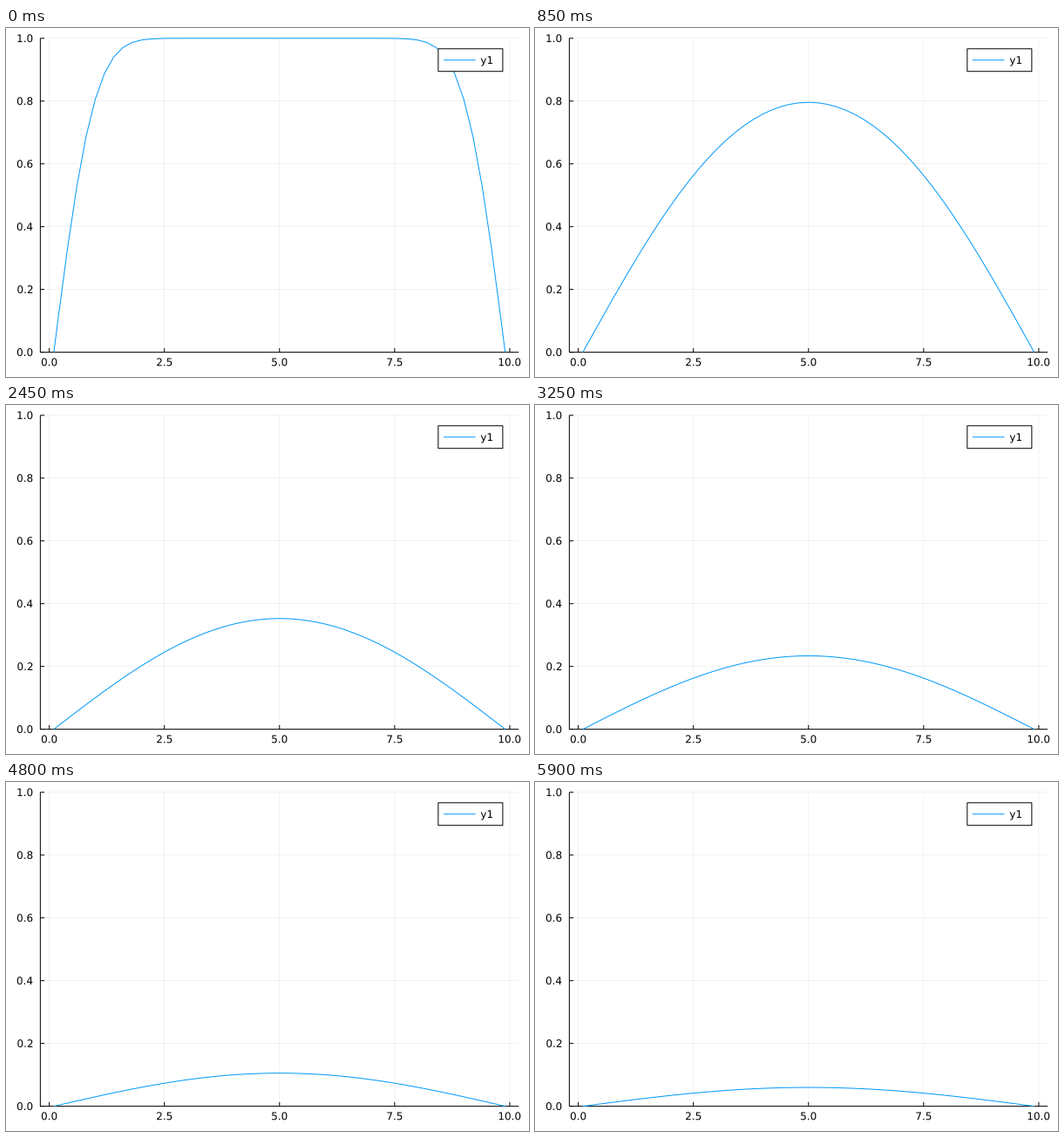
Write a matplotlib script that moves like this. It is 600x400 px and loops after 5950 ms.

```python
import numpy as np
import matplotlib.pyplot as plt
from matplotlib.animation import FuncAnimation
from matplotlib.patches import PathPatch, Rectangle
from matplotlib.textpath import TextPath
from matplotlib.transforms import Affine2D

W, H, DPI = 600, 400, 100
FRAMES, INTERVAL = 119, 50
PX = 72 / DPI                  # one pixel in points
FONT = 12                      # text size in pixels
BLUE = "#009afa"

# Plot area in pixels, y pointing down
LEFT, RIGHT, TOP, BOTTOM = 39.37, 588.19, 11.811, 371.6125
XMIN, XMAX = -0.194, 10.194
TICK = 4.72

# Heat equation on cells of width 0.2, with zero walls at 0.1 and 9.9
CELLS, RATE = 49, 0.25
FIRST, STRIDE = 24, 25


def to_x(x):
    return LEFT + (x - XMIN) / (XMAX - XMIN) * (RIGHT - LEFT)


def to_y(y):
    return BOTTOM - y * (BOTTOM - TOP)


def diffuse():
    u = np.ones(CELLS)
    rows = []
    for step in range(1, FIRST + STRIDE * (FRAMES - 1) + 1):
        padded = np.concatenate(([-u[0]], u, [-u[-1]]))
        u = u + RATE * (padded[2:] - 2 * u + padded[:-2])
        if step % STRIDE == FIRST:
            rows.append(np.concatenate(([0], u, [0])))
    return rows


plt.rcParams["font.family"] = "DejaVu Sans"
fig = plt.figure(figsize=(W / DPI, H / DPI), dpi=DPI, facecolor="white")
ax = fig.add_axes([0, 0, 1, 1])
ax.set_xlim(0, W)
ax.set_ylim(H, 0)
ax.axis("off")


def line(xs, ys, color="black", width=1.0, z=2, **kw):
    return ax.plot(xs, ys, color=color, lw=width * PX, zorder=z, snap=False,
                   solid_capstyle="butt", **kw)[0]


def label(x, y, text, align, z=3):
    """Draw text on baseline y; align 0, 0.5, 1 puts its ink's left, middle, right at x."""
    path = TextPath((0, 0), text, size=FONT)
    box = path.get_extents()
    place = Affine2D().scale(1, -1).translate(x - box.x0 - align * box.width, y)
    ax.add_patch(PathPatch(path.transformed(place), fc="black", lw=0,
                           zorder=z, snap=False))


for v in np.linspace(0, 10, 5):
    x = to_x(v)
    line([x, x], [BOTTOM, TOP], width=0.5, z=1, alpha=0.1)
    line([x, x], [BOTTOM, BOTTOM - TICK])
    label(x, 387.21, f"{v:.1f}", 0.5)

for v in np.linspace(0, 1, 6):
    y = to_y(v)
    line([LEFT, RIGHT], [y, y], width=0.5, z=1, alpha=0.1)
    line([LEFT, LEFT + TICK], [y, y])
    label(LEFT - 9, y + 4.32, f"{v:.1f}", 1)

line([LEFT, RIGHT], [BOTTOM, BOTTOM])
line([LEFT, LEFT], [BOTTOM, TOP])

# Legend
ax.add_patch(Rectangle((495.87, 23.80), 74.01, 25.92, fc="white", ec="black",
                       lw=PX, zorder=5, snap=False))
line([501.97, 538.58], [36.76, 36.76], color=BLUE, z=6)
label(544.68, 41.08, "y1", 0, z=6)

grid = np.concatenate(([0.1], 0.2 * np.arange(1, CELLS + 1), [9.9]))
profiles = diffuse()
curve = line(to_x(grid), to_y(profiles[0]), color=BLUE, z=4)


def update(i):
    curve.set_ydata(to_y(profiles[i]))
    return (curve,)


anim = FuncAnimation(fig, update, frames=FRAMES, interval=INTERVAL,
                     repeat=True, repeat_delay=0, blit=False)
plt.show()
```
